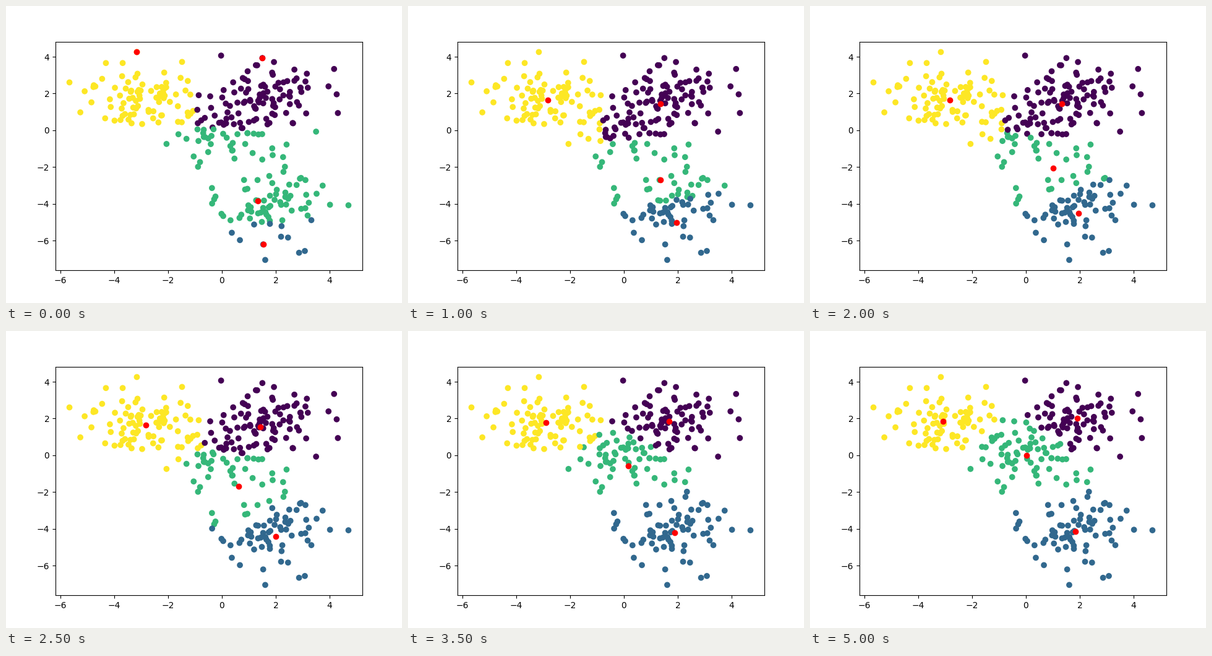
A matplotlib script for the animation above (5500 ms loop, 640 by 480 pixels).

```python
import numpy as np
import matplotlib.pyplot as plt
from matplotlib.animation import FuncAnimation

STEPS = 11
BLOBS = [(0, 0), (2, 2), (-3, 2), (2, -4)]
SEEDS = [(1.50, 3.92), (1.54, -6.20), (1.345, -3.85), (-3.16, 4.25)]


def make_points(per_blob=75):
    rng = np.random.RandomState(0)
    pts = np.concatenate([rng.normal(c, 1, (per_blob, 2)) for c in BLOBS])
    order = np.arange(len(pts))
    rng.shuffle(order)
    return pts[order]


def distances(a, b):
    return np.linalg.norm(a[:, None] - b[None], axis=2)


def kmeans(pts, centers, steps):
    """Return (centers, labels) for every Lloyd iteration."""
    history = []
    for _ in range(steps):
        labels = distances(pts, centers).argmin(axis=1)
        history.append((centers, labels))
        centers = np.array([pts[labels == k].mean(axis=0)
                            for k in range(len(centers))])
    return history


points = make_points()
# Each starting center is the data point closest to its seed.
start = points[distances(np.array(SEEDS), points).argmin(axis=1)]
history = kmeans(points, start, STEPS)

fig, ax = plt.subplots(figsize=(6.4, 4.8), dpi=100)
dots = ax.scatter(*points.T, c=history[0][1], cmap="viridis", vmin=0, vmax=3)
means = ax.scatter(*start.T, c="r")


def update(i):
    centers, labels = history[i]
    dots.set_array(labels)
    means.set_offsets(centers)
    return dots, means


anim = FuncAnimation(fig, update, frames=STEPS, interval=500, repeat=True)
plt.show()
```
